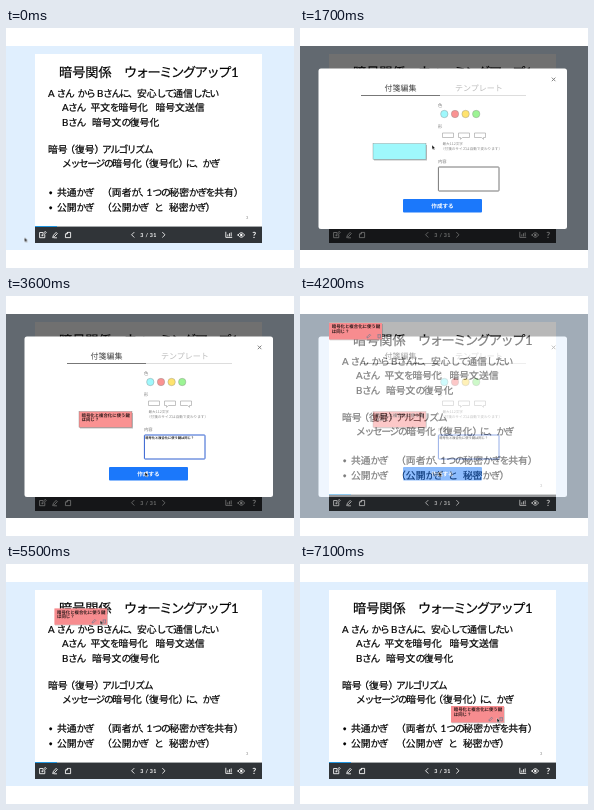
Animation, 288 px wide and 240 px high, one loop 7.2 s. Source, as an HTML page:

```html
<!DOCTYPE html>
<html lang="ja">
<head>
<meta charset="utf-8">
<title>付箋</title>
<style>
html, body { margin: 0; width: 100%; height: 100%; overflow: hidden; background: #fff; }
svg { display: block; width: 288px; height: 240px; }
text { font-family: "Noto Sans CJK JP", "Noto Sans CJK", sans-serif; text-rendering: geometricPrecision; white-space: pre; }
#slide { stroke: #000; stroke-width: .2; }
.head { font-size: 13.2px; }
.body { font-size: 9.8px; }
.head .kana { letter-spacing: -.107em; }
.body .kana { letter-spacing: -.14em; }
.body .close { letter-spacing: -.25em; }
.latin { font-family: Lato, "Open Sans", sans-serif; }
.dot { font-size: 7.5px; }
.icon { fill: none; stroke: #fff; stroke-width: .85; stroke-linejoin: round; stroke-linecap: round; }
.tab { font-size: 8px; text-anchor: middle; }
.label { font-size: 4.3px; fill: #777; }
.hint { font-size: 3.6px; fill: #888; }
.memo { font-size: 4.4px; font-weight: 700; fill: #2b1a1a; }
.field { font-size: 3.25px; font-weight: 700; fill: #222; }

.anim, .anim * { animation-duration: 7.2s; animation-iteration-count: infinite; animation-timing-function: linear; }
#modal { animation-name: modal; }
#paper { animation-name: paper; animation-timing-function: step-end; }
#focus { animation-name: focus; animation-timing-function: step-end; }
#memo { animation-name: drag; }
#show { animation-name: show; animation-timing-function: step-end; }
#cursor { animation-name: cursor; }
.line1 { animation-name: line1; }
.line2 { animation-name: line2; }
.field { animation-name: field; }

@keyframes modal {
  0%, 13.89% { opacity: 0; }
  15.28% { opacity: .15; }
  18.06% { opacity: .75; }
  20.83%, 56.94% { opacity: 1; }
  58.33% { opacity: .5; }
  59.72% { opacity: .18; }
  61.11% { opacity: .06; }
  65.28%, 100% { opacity: 0; }
}
@keyframes paper { 0% { fill: #9ff8fc; } 29.16% { fill: #fa9292; } }
@keyframes focus { 0% { stroke: #777; } 34.72% { stroke: #2f5fd0; } }
@keyframes show { 0% { opacity: 0; } 58.33% { opacity: 1; } }
@keyframes line1 {
  0%, 34.72% { clip-path: inset(0 100% 0 0); animation-timing-function: steps(11); }
  42.87%, 100% { clip-path: inset(0 0 0 0); }
}
@keyframes line2 {
  0%, 42.87% { clip-path: inset(0 100% 0 0); animation-timing-function: steps(4); }
  45.83%, 100% { clip-path: inset(0 0 0 0); }
}
@keyframes field {
  0%, 34.72% { clip-path: inset(0 100% 0 0); animation-timing-function: steps(15); }
  45.83%, 100% { clip-path: inset(0 0 0 0); }
}
@keyframes drag {
  0%, 75% { transform: translate(29px, 27px); }
  76.38% { transform: translate(48px, 44px); }
  86.11% { transform: translate(144px, 136px); }
  88.89%, 100% { transform: translate(151px, 142px); }
}
@keyframes cursor {
  0% { transform: translate(18.5px, 209.5px); }
  11.11%, 16.67% { transform: translate(36px, 207px); }
  23.6%, 24.5% { transform: translate(132px, 117px); }
  27.78%, 30.56% { transform: translate(155px, 86px); }
  34.72%, 44.44% { transform: translate(160px, 150px); }
  50%, 66.67% { transform: translate(139px, 176px); }
  73.61%, 75% { transform: translate(75px, 39px); }
  76.38% { transform: translate(94px, 56px); }
  86.11% { transform: translate(190px, 148px); }
  88.89%, 100% { transform: translate(197px, 154px); }
}
</style>
</head>
<body>
<svg viewBox="0 0 288 240">
  <rect y="18" width="288" height="204" fill="#e0effe"/>
  <rect x="29" y="26" width="227" height="173" fill="#fff"/>

  <g id="slide">
    <g class="head">
      <text x="53" y="49">暗号関係</text>
      <text x="118" y="49">ウォーミングアップ</text>
      <text x="225" y="49" class="latin">1</text>
    </g>
    <g class="body">
      <text x="42" y="68.5" class="latin">A</text>
      <text x="50.5" y="68.5">さん</text>
      <text x="71.5" y="68.5">から</text>
      <text x="91" y="68.5" class="latin">B</text>
      <text x="97" y="68.5">さんに、</text>
      <text x="131" y="68.5">安心して通信したい</text>

      <text x="56" y="83" class="latin">A</text>
      <text x="62" y="83">さん</text>
      <text x="84.5" y="83">平文を暗号化</text>
      <text x="149.5" y="83">暗号文送信</text>

      <text x="56" y="97.5" class="latin">B</text>
      <text x="62" y="97.5">さん</text>
      <text x="86" y="97.5">暗号文の復号化</text>

      <text x="42" y="124.5">暗号（復号）アルゴリズム</text>
      <text x="56" y="138.5">メッセージの暗号化（復号化）に、かぎ</text>

      <text x="42.5" y="166.8" class="latin dot">•</text>
      <text x="51" y="167.5">共通かぎ</text>
      <text x="98.5" y="167.5">（両者が、</text>
      <text x="140.5" y="167.5" class="latin">1</text>
      <text x="146.5" y="167.5">つの秘密かぎを共有）</text>

      <text x="42.5" y="181.8" class="latin dot">•</text>
      <text x="51" y="182.5">公開かぎ</text>
      <text x="98.5" y="182.5">（公開かぎ</text>
      <text x="148" y="182.5">と</text>
      <text x="163" y="182.5">秘密かぎ）</text>
    </g>
  </g>
  <text x="240" y="191" class="latin" font-size="4" fill="#888">3</text>

  <rect x="29" y="198" width="227" height="17" fill="#303438"/>
  <rect x="29" y="198" width="227" height="1" fill="#a4a8aa"/>
  <rect x="29" y="198" width="22" height="1" fill="#2196e0"/>
  <g class="icon">
    <path d="M36.6 204.5h-3v5.2h5.2v-2.7M36 207.6l.4-1.4 2.8-2.8 1 1-2.8 2.8z"/>
    <path d="M46.8 209.2l.7-2 2.6-2.8 1.2 1.2-2.6 2.8zM48 209.8h2.6"/>
    <path d="M59.8 206l1.6-1.6h3.2v5.2h-4.8zM59.8 206h1.6v-1.6"/>
    <path d="M128 204.4l-2.4 2.4 2.4 2.4M156.6 204.4l2.4 2.4-2.4 2.4"/>
    <path d="M219.8 204.2v5.2h6M221.8 208v-1.2M223.5 208v-2.4M225.2 208v-3.2"/>
    <path d="M232 207q3.3-4.8 6.6 0q-3.3 4.8-6.6 0z"/>
  </g>
  <circle cx="235.3" cy="207" r="1.2" fill="#fff"/>
  <text x="142.5" y="208.8" class="latin" font-size="5.4" font-weight="700" letter-spacing=".3" fill="#fff" text-anchor="middle">3 / 31</text>
  <text x="248.3" y="210" class="latin" font-size="8.5" font-weight="700" fill="#fff" text-anchor="middle">?</text>

  <g class="anim">
    <g id="modal">
      <rect y="18" width="288" height="204" fill="#000" opacity=".56"/>
      <rect x="18.5" y="40.5" width="248.5" height="160.5" rx="2.5" fill="#fff"/>
      <path d="M251.8 49.6l3.6 3.6m0-3.6l-3.6 3.6" stroke="#777" stroke-width=".9"/>
      <text x="100.5" y="63.2" class="tab" fill="#444">付箋編集</text>
      <text x="179" y="63.2" class="tab" fill="#bbb">テンプレート</text>
      <path d="M61 67.5h79" stroke="#777"/>
      <path d="M140 67.5h86" stroke="#ddd"/>

      <text x="138" y="79" class="label">色</text>
      <g stroke="#888" stroke-width=".4">
        <circle cx="144.3" cy="86" r="3.7" fill="#9ff8fc"/>
        <circle cx="155" cy="86" r="3.7" fill="#fa9292"/>
        <circle cx="165.6" cy="86" r="3.7" fill="#ffe36e"/>
        <circle cx="176.2" cy="86" r="3.7" fill="#9cf494"/>
      </g>
      <text x="138" y="99.5" class="label">形</text>
      <g fill="#fff" stroke="#aaa" stroke-width=".7">
        <path d="M142.5 105h11v4.5h-11z"/>
        <path d="M158.5 105h11v4.5h-7l-2 1.8v-1.8h-2z"/>
        <path d="M174.5 105h11v4.5h-2v1.8l-2-1.8h-7z"/>
      </g>
      <text x="142.5" y="116.5" class="hint">最大112文字</text>
      <text x="141" y="121.8" class="hint">（付箋のサイズは自動で変わります）</text>
      <text x="138" y="135.3" class="label">内容</text>
      <rect id="focus" x="138.4" y="139" width="60.6" height="24" rx=".6" fill="#fff"/>
      <text x="139.2" y="143.2" class="field">暗号化と複合化に使う鍵は同じ？</text>

      <rect x="74" y="117" width="53" height="15.5" fill="#000" opacity=".25"/>
      <rect id="paper" x="73" y="115.5" width="53" height="15.8" stroke="#666" stroke-width=".3"/>
      <text x="75.5" y="120.7" class="memo line1">暗号化と複合化に使う鍵</text>
      <text x="75.5" y="125.3" class="memo line2">は同じ？</text>

      <rect x="103" y="171" width="79" height="13.5" rx="1" fill="#1b78fb"/>
      <text x="142.5" y="180" font-size="5.6" font-weight="700" fill="#fff" text-anchor="middle">作成する</text>
    </g>

    <g id="show">
      <g id="memo">
        <rect x=".8" y="1" width="53" height="16.3" fill="#000" opacity=".2"/>
        <rect width="53" height="16.5" fill="#f78c8f"/>
        <text x="2.8" y="5.3" class="memo">暗号化と複合化に使う鍵</text>
        <text x="2.8" y="9.8" class="memo">は同じ？</text>
        <g fill="none" stroke="#6f7f92" stroke-width=".7">
          <path d="M38 13.8l2.6-2.6 1 1-2.6 2.6h-1z"/>
          <path d="M48.5 11.7h3.4M49 11.7v3.2h2.4v-3.2"/>
        </g>
      </g>
    </g>

    <path id="cursor" d="M0 0v4.4l1.1-.9.8 1.6.8-.4-.8-1.5h1.4z" fill="#111" stroke="#fff" stroke-width=".4"/>
  </g>
</svg>
<script>
// Kana and brackets are set tighter than kanji
document.querySelectorAll('#slide text').forEach(el => {
  el.innerHTML = el.textContent
    .replace(/[ぁ-ヶー、]+/g, '<tspan class="kana">$&</tspan>')
    .replace(/（/g, '<tspan dx="-.25em">（</tspan>')
    .replace(/）/g, '<tspan class="close">）</tspan>');
});
</script>
</body>
</html>
```
